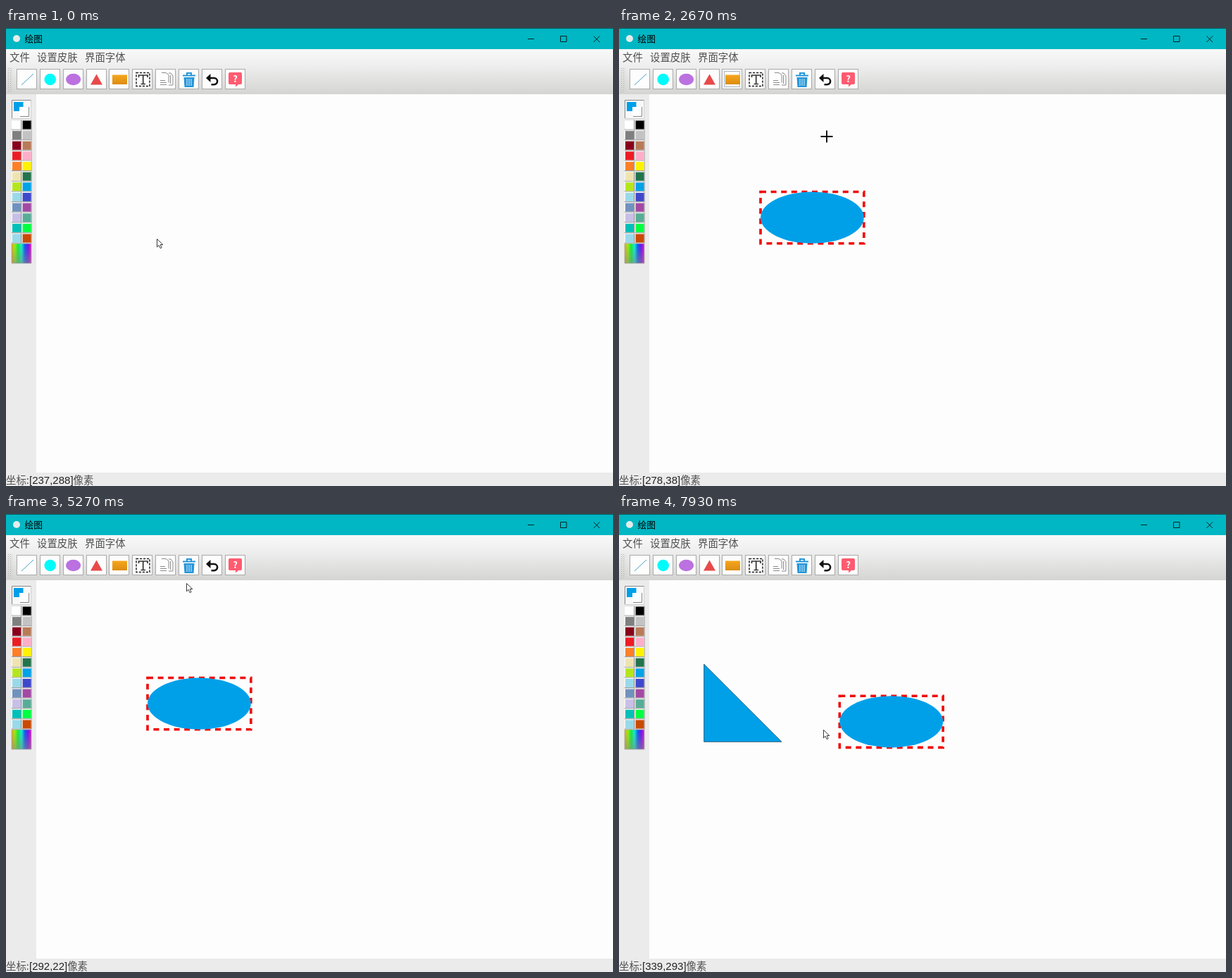
These frames come from a looping animation (862 by 650 pixels, 8000 ms). An HTML page:

```html
<!DOCTYPE html>
<html lang="zh-CN">
<head>
<meta charset="utf-8">
<title>绘图</title>
<style>
html, body { margin: 0; width: 100%; height: 100%; overflow: hidden; background: #fdfdfd; }
svg { display: block; width: 862px; height: 650px; }
text { font-family: "Noto Sans CJK SC", "Noto Sans CJK", sans-serif; white-space: pre; }
.menu { font-size: 14.4px; font-weight: 300; fill: #505050; }
.coord { font: 15px "Liberation Sans", Arial, sans-serif; fill: #222; }
.btn { fill: #fdfdfd; stroke: #a9a9a9; }
.hot { fill: none; stroke: #a8b4bc; visibility: hidden; }
.shape { fill: #00a0e9; stroke: #1b3c50; stroke-width: .75; }
.sel .shape { stroke: none; }
.marks { fill: none; stroke: #f00a0a; stroke-width: 3.65; stroke-dasharray: 8 6.6; visibility: hidden; }
</style>
</head>
<body>
<svg viewBox="0 0 862 650">
  <defs>
    <linearGradient id="bar" x2="0" y2="1">
      <stop stop-color="#f9f9f9"/><stop offset=".4" stop-color="#ededed"/><stop offset="1" stop-color="#d4d4d2"/>
    </linearGradient>
    <linearGradient id="amber" x2="0" y2="1">
      <stop stop-color="#f6a61c"/><stop offset="1" stop-color="#dc8d12"/>
    </linearGradient>
    <linearGradient id="hues"></linearGradient>
    <linearGradient id="fade" x2="0" y2="1">
      <stop stop-color="#888" stop-opacity="0"/><stop offset="1" stop-color="#888" stop-opacity=".6"/>
    </linearGradient>
    <pattern id="grip" width="3" height="3" patternUnits="userSpaceOnUse">
      <rect width="1" height="1" fill="#b2b2b2"/><rect x="1.5" y="1.5" width="1" height="1" fill="#c4c4c4"/>
    </pattern>
  </defs>

  <rect width="862" height="650" fill="#ebebeb"/>
  <rect x="43" y="94" width="819" height="537" fill="#fdfdfd"/>
  <rect width="862" height="30" fill="#00b7c3"/>
  <rect width="862" height="1" fill="#07575d"/>
  <circle cx="15" cy="15" r="5" fill="#e4ecec"/>
  <text x="26.5" y="20" font-size="12.7">绘图</text>
  <path d="M741 15.5h9M787.5 11.5h8.5v8h-8.5zM834.5 11.5l8.5 8.5M843 11.5l-8.5 8.5" fill="none" stroke="#0c2022"/>
  <rect y="30" width="862" height="64" fill="url(#bar)"/>
  <g class="menu">
    <text x="5" y="47">文件</text><text x="44" y="47">设置皮肤</text><text x="112" y="47">界面字体</text>
  </g>
  <rect x="2" y="56" width="7" height="36" fill="url(#grip)"/>

  <g id="tools"></g>
  <g fill="none">
    <path d="M22 81L39 65" stroke="#459fc4"/>
    <circle cx="62.7" cy="73" r="8.3" fill="#00fbfb"/>
    <ellipse cx="95.6" cy="73" rx="10.6" ry="8.2" fill="#bb71e0"/>
    <path d="M120 80.5h17l-8.5-15z" fill="#e84a4a"/>
    <path d="M151 66.5h21V80h-21z" fill="url(#amber)"/>
    <path d="M185 63.5h19v19h-19z" stroke="#222" stroke-width="1.5" stroke-dasharray="3.2 1.8"/>
    <path d="M188.5 70v-3H201v3M194.7 67v12M191.5 79.5h6.5" stroke="#333" stroke-width="1.7"/>
    <path d="M219 80.5h9M219 77.5h9M219 74.5h7M221 63.5h6l4 3v11M231 64h3l3 4v13h-6M233.5 67v12" stroke="#8a8a8a"/>
    <path d="M251 67.5h18M257 67v-3h6v3" stroke="#2596d9" stroke-width="2"/>
    <path d="M252.5 70h15l-1 14h-13z" fill="#2596d9"/>
    <path d="M257 72v10M260 72v10M263 72v10" stroke="#d9effb"/>
    <path d="M288 71h7.500a4.600 4.600 0 0 1 0 9.200h-4" stroke="#111" stroke-width="2.600"/>
    <path d="M284 71l6.500-6v12z" fill="#111"/>
    <path d="M318 63h15q2 0 2 2v13q0 2-2 2h-3l-4 3.500V80h-8q-2 0-2-2V65q0-2 2-2z" fill="#ff5b70"/>
  </g>
  <text x="325.6" y="77" text-anchor="middle" font-size="13" font-weight="700" fill="#fff">?</text>

  <path d="M8.5 102.5h27v26h-27z" fill="#f8f8f8" stroke="#d0d0d0"/>
  <path d="M8.5 128v-25.500h27M20 125.500h12.500V112" fill="none" stroke="#888"/>
  <path d="M11 105h13.500v13H11z" fill="#00a0e9"/>
  <path d="M19 112h13v13H19z" fill="#fff"/>
  <g id="palette"></g>
  <path d="M8 306h28v28H8z" fill="url(#hues)"/>
  <path d="M8 306h28v28H8z" fill="url(#fade)" stroke="#aaa" stroke-width=".8"/>

  <g id="scene"></g>
  <text y="646.5" class="menu">坐标:<tspan id="coord" class="coord" x="33"></tspan><tspan>像素</tspan></text>

  <g id="arrow"><path d="M.5.5v11.300l2.600-2.500 2 4.300 2-.9-1.900-4.200h3.600z" fill="#fff" stroke="#222" stroke-width=".9"/></g>
  <g id="cross"><path d="M-8.500 0h17M0-8.500v17" stroke="#000" stroke-width="1.800"/></g>
  <g id="move" fill="#fff" stroke="#222" stroke-width=".9"></g>
</svg>

<script>
const LOOP = 8000, TICKS = 120, UNIT = 0.73, LEFT = 43, TOP = 92, PITCH = 32.85;
const $ = id => document.getElementById(id);

function add(parent, tag, attrs) {
  const el = document.createElementNS('http://www.w3.org/2000/svg', tag);
  for (const key in attrs) el.setAttribute(key, attrs[key]);
  return parent.appendChild(el);
}
const show = (el, on) => { el.style.visibility = on ? 'visible' : 'hidden'; };
const easeOut = f => 1 - (1 - f) ** 2;

// toolbar slots
const ELLIPSE = 2, TRIANGLE = 3, RECT = 4, TRASH = 7;
const button = slot => ({ x: 28 + PITCH * slot, y: 68 });
const at = (x, y) => ({ x, y });

const oval = { w: 146.8, h: 73.2 }, square = { w: 110.3, h: 110.3 };
// each shape: tool armed, placed, removed, and the span it lies unselected
const shapes = [
  { tool: ELLIPSE, x: 201, y: 232.5, ...oval, arm: 11, born: 19, gone: 84, idle: [47, 74] },
  { tool: RECT, x: 400, y: 211.5, ...square, arm: 33, born: 47, gone: 65 },
  { tool: TRIANGLE, x: 120.7, y: 213, ...square, arm: 90, born: 99, gone: TICKS, idle: [109, TICKS] },
  { tool: ELLIPSE, x: 313.3, y: 258.2, ...oval, arm: 103, born: 109, gone: TICKS }
];

// pointer moves: departure, duration, destination
const START = at(216, 302.2);
const moves = [
  [-1, 1, at(214, 299)],
  [0, 10, button(ELLIPSE)],
  [14, 5, shapes[0]],
  [20, 2, at(152, 235)],
  [22, 4, at(211, 144)],
  [26, 6, button(RECT)],
  [37, 10, shapes[1]],
  [48, 2, at(431.9, 261.9)],
  [51, 1, at(435, 265)],
  [55, 7, at(267.1, 93.5)],
  [62, 3, button(TRASH)],
  [69, 4, at(260, 255)],
  [75, 4, at(256, 98)],
  [80, 3, button(TRASH)],
  [86, 4, button(TRIANGLE)],
  [91, 6, at(119.8, 212)],
  [100, 3, button(ELLIPSE)],
  [104, 4, shapes[3]],
  [113, 5, at(290.4, 305.9)]
];

function pointer(k) {
  let { x, y } = START;
  for (const [depart, ticks, to] of moves) {
    if (k < depart) break;
    const f = easeOut(Math.min(1, (k - depart) / ticks));
    x += (to.x - x) * f;
    y += (to.y - y) * f;
  }
  return { x, y };
}

// the readout trails by one tick and freezes off the canvas
function readout(k) {
  let p;
  do p = pointer(--k); while (p.y < TOP && k > -1);
  return `[${Math.round((p.x - LEFT) / UNIT)},${Math.round((p.y - TOP) / UNIT)}]`;
}

const hot = [];
for (let i = 0; i < 10; i++) {
  const x = 15.5 + Math.round(i * PITCH);
  add($('tools'), 'rect', { class: 'btn', x, y: 58.5, width: 28, height: 28 });
  hot.push(add($('tools'), 'rect', { class: 'hot', x: x + 3, y: 61.5, width: 22, height: 22 }));
}

const colors = ('fff 000 7f7f7f c3c3c3 88001b b97a57 ed1c24 ffaec9 ff7f27 fff200 efe4b0 22744c ' +
  'b5e61d 00a2e8 99d9ea 3f48cc 7092be a349a4 c8bfe7 58ad96 00c0b8 00ff40 99d9ea ca4a04').split(' ');
colors.forEach((c, i) => {
  const x = 8 + i % 2 * 14.6, y = 130.5 + (i >> 1) * 14.63;
  const layer = (inset, size, fill) =>
    add($('palette'), 'rect', { x: x + inset, y: y + inset, width: size, height: size, fill });
  layer(0, 14, '#9b9b9b');
  layer(0, 13, '#fafafa');
  layer(1, 12, '#' + c);
});

for (let i = 0; i <= 6; i++) add($('hues'), 'stop', { offset: i / 6, 'stop-color': `hsl(${40 + i * 45} 90% 50%)` });
for (let i = 0; i < 4; i++) add($('move'), 'path', { d: 'M-1.200 0v-4.800H-3L0-8l3 3.200H1.200V0', transform: `rotate(${i * 90})` });

for (const s of shapes) {
  const { x, y, w, h } = s, box = { x, y, width: w, height: h };
  s.g = add($('scene'), 'g', {});
  s.marks = add(s.g, 'rect', { class: 'marks', ...box });
  if (s.tool === ELLIPSE) add(s.g, 'ellipse', { class: 'shape', cx: x + w / 2, cy: y + h / 2, rx: w / 2, ry: h / 2 });
  else if (s.tool === RECT) add(s.g, 'rect', { class: 'shape', ...box });
  else add(s.g, 'path', { class: 'shape', d: `M${x} ${y}v${h}h${w}z` });
}

function render(k) {
  const { x, y } = pointer(k);
  const armed = shapes.find(s => k >= s.arm && k < s.born);
  const over = y > 58 && y < 87 ? Math.floor((x - 15) / PITCH) : -1;
  hot.forEach((el, i) => show(el, i === over || (armed && armed.tool === i)));

  let mode = armed && y >= TOP ? 'cross' : 'arrow';
  for (const s of shapes) {
    const alive = k >= s.born && k < s.gone;
    const picked = alive && !(s.idle && k >= s.idle[0] && k < s.idle[1]);
    s.g.style.display = alive ? '' : 'none';
    s.g.setAttribute('class', picked ? 'sel' : '');
    show(s.marks, picked);
    if (alive && !armed && Math.abs(x - s.x - s.w / 2) <= s.w / 2 && Math.abs(y - s.y - s.h / 2) <= s.h / 2 + 1) mode = 'move';
  }
  const shift = mode === 'arrow' ? 0 : 12.5;
  for (const id of ['arrow', 'cross', 'move']) show($(id), id === mode);
  $(mode).setAttribute('transform', `translate(${Math.round(x + shift)} ${Math.round(y + shift)})`);
  $('coord').textContent = readout(k);
}

let start, last = -1;
function loop(now) {
  start ??= now;
  const k = Math.floor(((now - start) % LOOP + 4) / LOOP * TICKS) % TICKS;
  if (k !== last) render(last = k);
  requestAnimationFrame(loop);
}
render(0);
requestAnimationFrame(loop);
</script>
</body>
</html>
```
